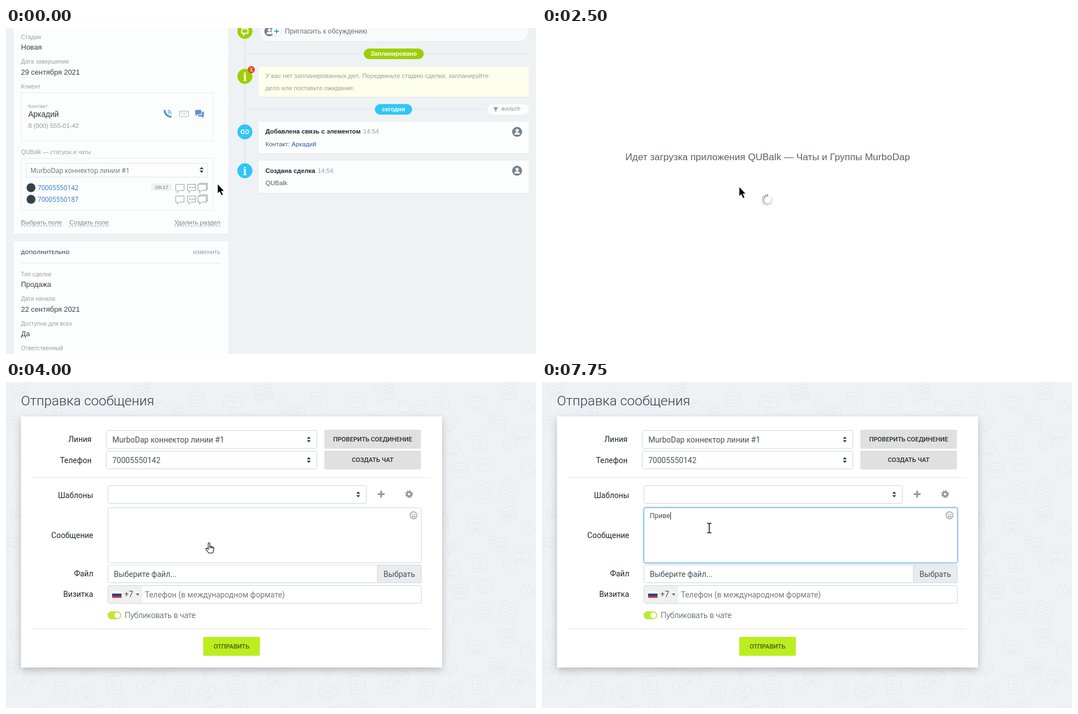
An HTML page that plays this animation: 954 by 587 pixels, repeating every 8000 ms.

```html
<!DOCTYPE html>
<html lang="ru">
<head>
<meta charset="utf-8">
<title>Отправка сообщения</title>
<style>
  html, body { margin: 0; width: 100%; height: 100%; overflow: hidden; background: #fff; }
  svg { display: block; }
  text { white-space: pre; }
  .arial { font-family: "Liberation Sans", Arial, sans-serif; }
  .open { font-family: "Open Sans", "Noto Sans", sans-serif; }
  .roboto { font-family: Roboto, sans-serif; }
</style>
</head>
<body>
<svg id="stage" width="954" height="587" viewBox="0 0 954 587"></svg>
<script>
const LOOP = 8000, STEP = 250;
const APP = 'QUBalk', MESSENGER = 'MurboDap', PERSON = 'Аркадий';
const PHONES = ['70005550142', '70005550187'];
const LINE_NAME = MESSENGER + ' коннектор линии #1';

// Text is placed by the vertical middle of its capitals, on a whole-pixel baseline.
const text = (x, y, size, fill, s, attrs = '') =>
  `<text x="${x}" y="${Math.round(y + size * .36)}" font-size="${size}" fill="${fill}" ${attrs}>${s}</text>`;
const rect = (x, y, w, h, fill, attrs = '') =>
  `<rect x="${x}" y="${y}" width="${w}" height="${h}" fill="${fill}" ${attrs}/>`;
const box = (x, y, w, h, stroke, fill = '#fff', r = 0) =>
  rect(x + .5, y + .5, w - 1, h - 1, fill, `stroke="${stroke}" rx="${r}"`);
const circle = (x, y, r, fill, attrs = '') =>
  `<circle cx="${x}" cy="${y}" r="${r}" fill="${fill}" ${attrs}/>`;
const path = (d, stroke, width = 1, fill = 'none', attrs = '') =>
  `<path d="${d}" stroke="${stroke}" stroke-width="${width}" fill="${fill}" ${attrs}/>`;
const move = (x, y, body, attrs = '') => `<g transform="translate(${x} ${y})" ${attrs}>${body}</g>`;
const group = (id, body, attrs = '') => `<g id="${id}" ${attrs}>${body}</g>`;
const BOLD = 'font-weight="700"', MIDDLE = 'text-anchor="middle"', END = 'text-anchor="end"';

const gear = (x, y, color, scale = 1) => move(x, y, `<g transform="scale(${scale})">` +
  circle(0, 0, 3.4, 'none', `stroke="${color}" stroke-width="2.6"`) +
  circle(0, 0, 5.3, 'none', `stroke="${color}" stroke-width="2" stroke-dasharray="2.4 1.76"`) + '</g>');
const sorter = (x, y) =>
  path(`M${x - 3.5} ${y - 1.3}h7l-3.5-4zM${x - 3.5} ${y + 1.3}h7l-3.5 4z`, 'none', 0, '#343a40');
const avatar = (x, y) => circle(x, y, 9, '#78838e') + circle(x, y - 2.4, 2.8, '#fff') +
  path(`M${x - 5} ${y + 5}q0-4 5-4t5 4z`, 'none', 0, '#fff');
const bubble = (x, y) => `M${x} ${y}h15v11h-8l-4 4v-4h-3z`;

function leftColumn() {
  const field = (y, label, value) =>
    text(27, y, 10.6, '#9aa0a6', label) + text(27, y + 18.5, 13, '#3b4046', value);
  const dashedLink = (x, w, s) => text(x, 350, 11.3, '#7d848c', s) +
    path(`M${x} 356.5h${w}`, '#8b929a', 1, 'none', 'stroke-dasharray="3 2"');
  const chatRow = (y, phone) => circle(45, y, 8, '#35424c') +
    text(57, y, 11.7, '#2f76c6', phone, 'class="open"') +
    path(bubble(305.5, y - 6) + bubble(326.5, y - 6), '#9ba1a6') +
    path(`M330 ${y - .5}h2m2 0h2m2 0h2`, '#777', 1.6) +
    path(`M348.5 ${y - 6}v-2h14v11h-2` + bubble(345.5, y - 6), '#92989d');
  return rect(14, 0, 386, 371, '#fcfdfd') + rect(14, 371, 386, 1, '#e2e6e9') +
    rect(14, 384, 386, 203, '#fcfdfd') +
    field(16, 'Стадия', 'Новая') + field(60.5, 'Дата завершения', '29 сентября 2021') +
    text(27, 105, 10.6, '#9aa0a6', 'Клиент') +
    box(27, 116, 346, 88, '#e9edf0', '#fcfdfd') +
    text(40, 140.5, 9.7, '#9aa0a6', 'Контакт') + text(40, 154.5, 14, '#30353a', PERSON) +
    text(40, 175.5, 11.4, '#92989f', '8 (000) 555-01-42') +
    path('M285.5 149q1 9 11 11', '#5b92d2', 3.4, 'none', 'stroke-linecap="round"') +
    path('M291 148q6 1 6 7M291 151q3 1 3 4', '#5b92d2', 1.3) +
    box(312, 149, 17, 11, '#afb5bb', '#fcfdfd', 1) + path('M313 150l7.5 6 7.5-6', '#afb5bb') +
    path('M341 148h10v7h-6l-3 3v-3h-1z', '#5b92d2', 1, '#5b92d2') +
    path('M353 151h3v8h-1v3l-3-3h-6v-2h7z', '#5b92d2', .6, '#5b92d2') +
    text(27, 223, 10.5, '#9aa0a6', APP + ' — статусы и чаты') +
    box(27, 234, 346, 95, '#e9edf0', '#fcfdfd') + box(36, 243, 327, 26, '#e1e5e8', '#fdfdfd') +
    text(44, 257, 11.7, '#666c72', LINE_NAME, 'class="open"') + sorter(352, 255.5) +
    rect(261, 280, 38, 13, '#eff1f2', 'rx="5"') + text(280.5, 286.5, 9.4, '#777d82', '09:17', MIDDLE) +
    chatRow(287.5, PHONES[0]) + chatRow(308.5, PHONES[1]) +
    dashedLink(27, 74, 'Выбрать поле') + dashedLink(114, 72, 'Создать поле') +
    dashedLink(303, 84, 'Удалить раздел') +
    text(27, 404, 9.4, '#464c53', 'ДОПОЛНИТЕЛЬНО', 'class="open" font-weight="600"') +
    text(386, 403, 11.4, '#9aa0a6', 'изменить', END) + rect(27, 423, 360, 1, '#e6eaed') +
    field(443, 'Тип сделки', 'Продажа') + field(487.5, 'Дата начала', '22 сентября 2021') +
    field(532, 'Доступна для всех', 'Да') + text(27, 576, 10.6, '#9aa0a6', 'Ответственный');
}

function timeline() {
  const green = '#9dcf00', blue = '#2fc6f6';
  const badge = (y, color) => rect(430, y, 25, 1, '#dce1e5') + circle(430, y, 13.5, color);
  const info = (y, color) => badge(y, color) +
    text(430, y + 1, 20, '#fff', 'i', `${MIDDLE} ${BOLD} font-family="Noto Serif, serif"`);
  const card = (y, h, fill) => rect(455, y, 486, h + 1, '#e1e6e9') + rect(455, y, 486, h, fill);
  const pill = (x, y, w, color, s) => rect(x, y - 9.5, w, 19, color, 'rx="9.5"') +
    text(x + w / 2, y, 10.7, '#fff', s, `${MIDDLE} ${BOLD}`);
  return rect(429.5, 0, 1, 258, '#d8dde1') + rect(430, 46, 511, 1, '#dde2e6') +
    rect(430, 146, 437, 1, '#dde2e6') +
    badge(6, green) + path('M424.5 1.5h11v8h-5l-3 3v-3h-3z', '#fff', 1.8) +
    box(455, -13, 486, 38, '#e4e8eb', '#f8fafb', 18) + avatar(474, 6) +
    circle(487, 6, 9, '#fff', 'stroke="#e4e8eb"') + path('M483 6h8m-4-4v8', '#2f9fe6', 1.8) +
    text(502, 6, 12.2, '#6b7279', 'Пригласить к обсуждению') +
    pill(644, 46.5, 108, green, 'Запланировано') +
    info(87, green) + circle(441.5, 75, 6.5, '#ee4d22') +
    text(441.5, 75, 8.5, '#fff', '1', `${MIDDLE} ${BOLD}`) + card(70, 54, '#fefeec') +
    text(467, 86, 11.3, '#9c9f98', 'У вас нет запланированных дел. Передвиньте стадию сделки, запланируйте') +
    text(467, 107.5, 11.3, '#9c9f98', 'дело или поставьте ожидание.') +
    pill(664, 146.5, 67, blue, 'сегодня') + rect(867, 137, 74, 19, '#fcfdfd', 'rx="9.5"') +
    path('M877 143h9l-3.5 4v4l-2-1.5v-2.5z', 'none', 0, '#878e95') +
    text(891, 146, 8.9, '#878e95', 'ФИЛЬТР') +
    badge(187, blue) + path('M429 183.5h-2.5a3.3 3.3 0 0 0 0 6.6h2.5M431 183.5h2.5a3.3 3.3 0 0 1 0 6.6h-2.5M427 186.8h6', '#fff', 1.7) +
    card(169, 57, '#fcfdfd') + avatar(920, 187) +
    text(467, 186, 11.35, '#22262a', 'Добавлена связь с элементом', BOLD) +
    text(643, 186, 11.3, '#9aa0a6', '14:54') +
    text(467, 209, 11.3, '#555b61', `Контакт: <tspan fill="#2f5ba7">${PERSON}</tspan>`) +
    info(257, blue) + card(239, 58, '#fcfdfd') + avatar(920, 257) +
    text(467, 256.5, 11.35, '#22262a', 'Создана сделка', BOLD) +
    text(561, 256.5, 11.3, '#9aa0a6', '14:54') + text(467, 279, 11.5, '#555b61', APP);
}

function crm() {
  const dots = Array.from({ length: 8 }, (_, i) =>
    rect(18 + (i % 2) * 4, 217 + (i >> 1) * 3, 2, 2, '#a7adb3')).join('');
  return rect(0, 0, 954, 587, '#eef2f4') + leftColumn() + timeline() +
    group('hover', dots + gear(385, 223, '#b7bdc3', .8) +
      path('M348.5 281.5v-2h14v11h-2' + bubble(345.5, 281.5), '#555b60')) +
    group('tip', box(363, 295, 119, 21, '#a5a5a5') + text(367, 305.5, 10.6, '#575757', 'Отправить сообщение'));
}

function slider() {
  return rect(0, 0, 305, 587, '#000', 'opacity=".4"') + rect(305, 0, 649, 587, '#ecf1f5') +
    path('M305 13h-20.5a16.7 16.7 0 0 0 0 33.4H305z', 'none', 0, '#34c4f1') +
    path('M281 25.5l9 9m0-9l-9 9', '#fff', 1.4);
}

function doodles() {
  const shapes = {
    calendar: 'M-15-11h30v24h-30zM-15-5h30M-9-14v5M9-14v5M-10 1h5v5h-5zM-2 1h5v5h-5zM6 1h5v5h-5z',
    sheet: 'M-13-16h20l6 6v26h-26zM-8-8h12M-8-2h16M-8 4h16M-8 10h16',
    clock: 'M-12 0a12 12 0 1 0 24 0a12 12 0 1 0-24 0M0-7v7l5 3',
    mug: 'M-11-6h19v9q0 8-8 8h-3q-8 0-8-8zM8-3q8-1 7 4t-8 4M-5-14q-3 3 0 6M2-14q-3 3 0 6',
    phone: 'M-9-16h17q3 0 3 3v26q0 3-3 3h-17q-3 0-3-3v-26q0-3 3-3zM-12-10h23M-12 9h23M-5-4h9v6h-9z',
    leaf: 'M-9 11q-3-18 17-23q5 18-17 23l14-17',
    board: 'M-16-11h32v18h-32zM0 7v8M-8 16l8-9l8 9M-11 2l6-7l5 4l9-7'
  };
  const spots = [['sheet', 48, 34, -9], ['board', 112, 38, 8], ['mug', 203, 45, 10], ['calendar', 167, 18, -14],
    ['calendar', 82, 157, -10], ['clock', 127, 149, 8], ['mug', 203, 157, 10], ['leaf', 80, 203, 8],
    ['sheet', 122, 194, -14], ['sheet', 170, 193, 20], ['calendar', 150, 72, 14], ['leaf', 68, 78, -10],
    ['sheet', 118, 106, -6], ['phone', 22, 118, 12], ['board', 66, 121, -18], ['clock', 171, 110, 0],
    ['clock', 29, 183, 5], ['board', 192, 92, 16], ['phone', 12, 58, -12]];
  const items = spots.map(([name, x, y, turn]) =>
    `<path d="${shapes[name]}" transform="translate(${x} ${y}) rotate(${turn})"/>`).join('');
  return `<defs><pattern id="doodles" width="219.5" height="219.5" patternUnits="userSpaceOnUse"
    patternTransform="translate(76.5 0)"><g fill="none" stroke="#e2e7ea">${items}</g></pattern>
    <filter id="shadow" x="-10%" y="-10%" width="120%" height="120%">
    <feDropShadow dx="0" dy="5" stdDeviation="7" flood-color="#000" flood-opacity=".23"/></filter></defs>`;
}

function form() {
  const edge = '#ced4da', ink = '#495057', grey = '#e0e0e0';
  const label = (x, y, s) => text(x, y, 14, '#212529', s, END);
  const select = (x, y, w, s) => box(x, y, w, 33, edge, '#fff', 3) +
    text(x + 11.5, y + 16.5, 14, ink, s) + sorter(x + w - 15, y + 16.5);
  const button = (x, y, w, fill, ink, s) => rect(x, y, w, 34, fill, 'rx="2"') +
    text(x + w / 2, y + 16.5, 11.2, ink, s, `${MIDDLE} font-weight="500"`);
  return doodles() + rect(0, 0, 954, 587, '#eef2f5') + rect(0, 0, 954, 587, 'url(#doodles)') +
    text(27, 33.5, 24.4, '#343a40', 'Отправка сообщения', 'font-weight="300"') +
    rect(27, 62, 758, 452, '#fff', 'filter="url(#shadow)"') +
    label(154, 103, 'Линия') + select(180, 87, 380, LINE_NAME) +
    label(154, 140.5, 'Телефон') + select(180, 124, 380, PHONES[0]) +
    button(573, 86, 174, grey, '#26292c', 'ПРОВЕРИТЬ СОЕДИНЕНИЕ') +
    button(573, 123.5, 174, grey, '#26292c', 'СОЗДАТЬ ЧАТ') +
    rect(48, 171.5, 716, 1, '#e3e3e3') + label(157, 204, 'Шаблоны') + select(183, 186, 466, '') +
    path('M669 202h12.5m-6.25-6.25v12.5', '#959595', 3) + gear(725.5, 202, '#959595', 1.1) +
    label(157, 275.5, 'Сообщение') + box(183, 226, 565, 100, edge, '#fff', 3) +
    group('focus', box(181, 224, 569, 104, '#d3e9fb', 'none', 5) +
      box(182, 225, 567, 102, '#b4daf8', 'none', 4) + box(183, 226, 565, 100, '#73b4e8', 'none', 3)) +
    circle(733.5, 240, 6.3, 'none', 'stroke="#8d8d8d" stroke-width="1.2"') +
    circle(731, 238.3, 1, '#8d8d8d') + circle(736, 238.3, 1, '#8d8d8d') +
    path('M730 241.5q3.5 4.5 7 0z', '#8d8d8d') +
    text(194, 240.5, 12.4, ink, '', 'id="typed"') + rect(194, 234, 1, 14, '#222', 'id="caret"') +
    label(157, 345, 'Файл') + box(183, 329, 565, 33, edge, '#fff', 3) +
    box(668, 329, 80, 33, edge, '#e9ecef', 2) + text(194, 345.5, 14, ink, 'Выберите файл...') +
    text(708, 345.5, 14, ink, 'Выбрать', MIDDLE) +
    label(157, 382, 'Визитка') + box(183, 366, 565, 33, edge, '#fff', 3) + rect(184, 367, 61, 31, '#f0f0f0') +
    rect(191, 377, 17, 4, '#fff') + rect(191, 381, 17, 4, '#1546a0') + rect(191, 385, 17, 3.5, '#d52b1e') +
    text(213, 382, 14, ink, '+7') + path('M234 381h6l-3 3.5z', 'none', 0, '#555') +
    text(250, 382.5, 14, '#747b82', 'Телефон (в международном формате)') +
    rect(183.5, 413.5, 23.5, 13, '#bdeb32', 'rx="6.5" id="track"') + circle(201, 420, 5.2, '#fff', 'id="knob"') +
    text(214, 419.5, 14, '#343a40', 'Публиковать в чате', 'font-weight="300"') +
    rect(48, 444, 716, 1, '#e3e3e3') + button(355, 459, 102, '#bcee1f', '#4a5b16', 'ОТПРАВИТЬ');
}

function loader() {
  const blades = Array.from({ length: 16 }, (_, i) =>
    `<path d="M0-6v-4.2" stroke="#444" stroke-width="1.4" opacity="${Math.max(.08, .9 - i * .058)}"
      transform="rotate(${-22.5 * i})"/>`).join('');
  return text(150, 232, 17.4, '#5c5f61', `Идет загрузка приложения ${APP} — Чаты и Группы ${MESSENGER}`) +
    move(406, 309.5, group('spinner', blades));
}

const cursors = {
  arrow: path('M0 0V17l3.8-3.6 2.9 7 2.9-1.2-2.9-6.7H11.6z', '#fff', .6, '#000'),
  hand: path('M5 2q0-1.5 1.5-1.5T8 2v5.5q1.7-1 2.6.3 1.6-.6 2.3.6 2-.3 2.1 1.6v4l-2 5H6L1 12.3q-.8-1.8.8-2.3 1.3 0 3.2 2zM8 7.5v3M10.6 8v2.6M12.9 8.6v2.2',
    '#000', 1.1, '#fff'),
  beam: path('M-4-8.5h3q1 0 1 1 0-1 1-1h3M0-7.5v15M-4 8.5h3q1 0 1-1 0 1 1 1h3', '#111', 1.5)
};
const cursorTrack = [[0, 'arrow', 381, 281], [250, 'hand', 361, 294], [500, 'hand', 359, 289],
  [2500, 'arrow', 355, 286], [3500, 'hand', 359, 289], [5250, 'beam', 321, 270], [5500, 'beam', 301, 263]];
const typing = [[0, ''], [7000, 'П'], [7250, 'Пр'], [7500, 'При'], [7750, 'Приве']];

const $ = id => document.getElementById(id);
$('stage').innerHTML = rect(0, 0, 954, 587, '#fff') + group('crm', crm(), 'class="arial"') +
  group('slider', slider()) + group('form', form(), 'class="roboto"') +
  group('loader', loader(), 'class="arial"') + group('cursor', Object.keys(cursors).map(k => group(k, cursors[k])).join(''));

const show = (id, on) => $(id).setAttribute('display', on ? 'inline' : 'none');
const set = (id, attrs) => Object.entries(attrs).forEach(([k, v]) => $(id).setAttribute(k, v));
const latest = (track, t) => track.filter(([start]) => start <= t).pop();

function draw(now) {
  const t = Math.floor(now % LOOP / STEP) * STEP;
  const between = (a, b) => t >= a && t < b;
  show('crm', t < 2500);
  show('hover', t >= 250);
  set('hover', { opacity: t < 500 ? .5 : 1 });
  show('tip', between(1000, 1750));
  show('slider', between(2250, 2500));
  show('loader', between(2500, 4000));
  set('spinner', { transform: `rotate(${(t - 2500) * .2})` });
  show('form', t >= 3500);

  const switched = t >= 3750;
  set('track', { fill: switched ? '#bdeb32' : '#f2f3cf', stroke: switched ? '#b1dd2d' : '#c9cbae' });
  set('knob', { cx: switched ? 200.5 : 194.5, fill: switched ? '#fff' : '#bfc5c9' });

  show('focus', t >= 5500);
  set('focus', { opacity: t < 5750 ? .35 : 1 });
  $('typed').textContent = latest(typing, t)[1];
  show('caret', t >= 5500 && !between(6250, 6750));
  if (t >= 3500) set('caret', { x: Math.round(194 + $('typed').getComputedTextLength()) });

  const [, kind, x, y] = latest(cursorTrack, t);
  Object.keys(cursors).forEach(k => show(k, k === kind));
  set('cursor', { transform: `translate(${x} ${y})` });
}

const started = performance.now();
(function tick() {
  draw(performance.now() - started);
  requestAnimationFrame(tick);
})();
</script>
</body>
</html>
```
